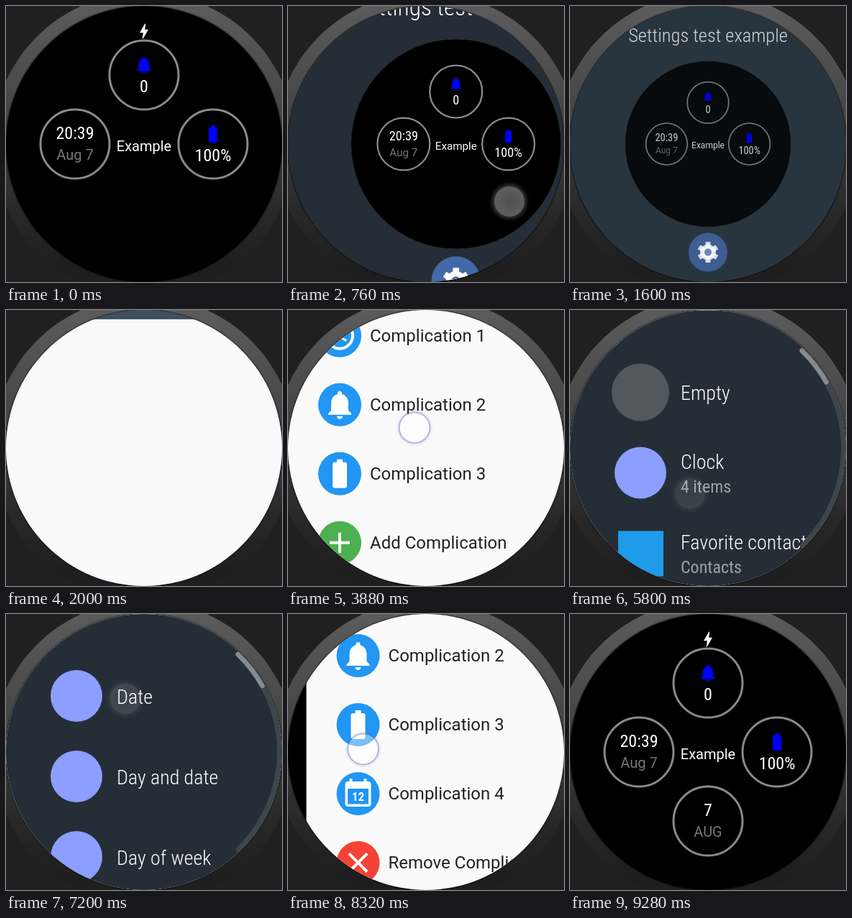
Animation of 384x384 px, one loop 9.52 s. Source, as an HTML page with a canvas:

```html
<!DOCTYPE html>
<html lang="en">
<head>
<meta charset="utf-8">
<title>Watch complications</title>
<style>
html, body { margin: 0; width: 100%; height: 100%; overflow: hidden; background: #202020; }
canvas { display: block; width: 384px; height: 384px; }
</style>
</head>
<body>
<canvas id="stage" width="384" height="384"></canvas>
<script>
const ctx = document.getElementById('stage').getContext('2d');
const LOOP = 9520, SIZE = 384, MID = 192, TAU = Math.PI * 2;
const SANS = 'Roboto, sans-serif';
const NARROW = '"Roboto Condensed", Roboto, sans-serif';
const BLUE = '#2196f3', SLATE = '#252e36', LIST_SCROLL = 158;

// 24-unit icon outlines
const ICON = {
  bell: new Path2D('M12 22c1.1 0 2-.9 2-2h-4c0 1.1.9 2 2 2zm6-6v-5c0-3.07-1.64-5.64-4.5-6.32V4c0-.83-.67-1.5-1.5-1.5s-1.5.67-1.5 1.5v.68C7.63 5.36 6 7.92 6 11v5l-2 2v1h16v-1l-2-2z'),
  battery: new Path2D('M15.67 4H14V2h-4v2H8.33C7.6 4 7 4.6 7 5.33v15.34C7 21.4 7.6 22 8.33 22h7.34c.73 0 1.33-.6 1.33-1.33V5.33C17 4.6 16.4 4 15.67 4z'),
  bolt: new Path2D('M11 21h-1l1-7H7.5c-.6 0-.6-.3-.4-.7L13 3h1l-1 7h3.5c.5 0 .6.3.4.7L11 21z'),
  plus: new Path2D('M19 13h-6v6h-2v-6H5v-2h6V5h2v6h6z'),
  cross: new Path2D('M19 6.4L17.6 5 12 10.6 6.4 5 5 6.4 10.6 12 5 17.6 6.4 19 12 13.4 17.6 19 19 17.6 13.4 12z'),
  hands: new Path2D('M12.5 7H11v6l5.25 3.15.75-1.23-4.5-2.67z')
};

const clamp = v => Math.min(1, Math.max(0, v));
const span = (t, from, to) => clamp((t - from) / (to - from));
const easeOut = (p, k) => 1 - Math.pow(1 - p, k);

function layer(alpha, dx, dy, draw) {
  if (alpha <= 0) return;
  ctx.save();
  ctx.globalAlpha *= alpha;
  ctx.translate(dx, dy);
  draw();
  ctx.restore();
}

function disc(x, y, r, color) {
  ctx.beginPath();
  ctx.arc(x, y, r, 0, TAU);
  ctx.fillStyle = color;
  ctx.fill();
}

function ring(x, y, r, width, color, from = 0, to = TAU) {
  ctx.beginPath();
  ctx.arc(x, y, r, from, to);
  ctx.lineWidth = width;
  ctx.strokeStyle = color;
  ctx.stroke();
}

function fillScreen(color) {
  ctx.fillStyle = color;
  ctx.fillRect(0, 0, SIZE, SIZE);
}

function text(str, x, y, size, color, align = 'left', family = SANS, weight = 400) {
  ctx.font = `${weight} ${size}px ${family}`;
  ctx.textAlign = align;
  ctx.fillStyle = color;
  ctx.fillText(str, x, y);
}

function icon(path, x, y, scale, color) {
  ctx.save();
  ctx.translate(x, y);
  ctx.scale(scale, scale);
  ctx.translate(-12, -12);
  ctx.fillStyle = color;
  ctx.fill(path);
  ctx.restore();
}

// Touch marks: a soft grey glow on dark screens, a thin outline on light ones
function darkTouch(x, y, alpha) {
  layer(alpha, x, y, () => {
    const glow = ctx.createRadialGradient(0, 0, 0, 0, 0, 28);
    glow.addColorStop(0, 'rgba(255,255,255,.31)');
    glow.addColorStop(.72, 'rgba(255,255,255,.37)');
    glow.addColorStop(.79, 'rgba(190,205,225,.18)');
    glow.addColorStop(1, 'rgba(190,205,225,0)');
    disc(0, 0, 28, glow);
  });
}

function lightTouch(x, y, alpha) {
  layer(alpha, x, y, () => {
    const glow = ctx.createRadialGradient(0, 0, 20, 0, 0, 26);
    glow.addColorStop(0, 'rgba(85,95,180,.22)');
    glow.addColorStop(1, 'rgba(85,95,180,0)');
    ring(0, 0, 23, 6, glow);
    disc(0, 0, 21.5, 'rgba(255,255,255,.4)');
    ring(0, 0, 21.5, 1.6, 'rgba(85,95,180,.4)');
  });
}

const tap = (t, from, to) => span(t, from - 20, from + 40) * (1 - span(t, to - 120, to));

// Watch face
function face({ full = false, charging = true } = {}) {
  const label = (s, x, y) => text(s, x, y, 24, '#fff', 'center', NARROW);
  const note = (s, x, y) => text(s, x, y, 20, '#777', 'center');
  fillScreen('#000');
  if (charging) icon(ICON.bolt, 192, 35, 1.15, '#fff');
  const spots = [[192, 96], [96, 192], [288, 192]];
  if (full) spots.push([192, 288]);
  for (const [x, y] of spots) ring(x, y, 48, 3, '#8a8a8a');
  icon(ICON.bell, 192, 82, 1.2, '#00f');
  label('0', 192, 120);
  label('20:39', 96, 185);
  note('Aug 7', 96, 214);
  icon(ICON.battery, 288, 178, 1.2, '#00f');
  label('100%', 288, 216);
  text('Example', 192, 202, 20, '#fff', 'center');
  if (full) {
    label('7', 192, 281);
    note('AUG', 192, 310);
  }
}

function gear(x, y, r) {
  disc(x, y, 45, '#4469a8');
  disc(x, y, r * .76, '#fff');
  for (let i = 0; i < 6; i++) {
    ctx.save();
    ctx.translate(x, y);
    ctx.rotate(i * TAU / 6);
    ctx.fillRect(-r * .24, -r, r * .48, r);
    ctx.restore();
  }
  disc(x, y, r * .35, '#4469a8');
}

// Face shrinking into the face picker
function picker(t) {
  const p = easeOut(span(t, 680, 960), 2.7);
  const scale = 1 - .4 * p;
  const leave = span(t, 1560, 1760);
  fillScreen('#000');
  layer(span(p, 0, .3), 0, 0, () => fillScreen(SLATE));
  layer(leave, 0, 0, () => fillScreen('#3e515f'));
  layer(1 - leave, MID + 44 * Math.sin(Math.PI * p), MID, () => {
    ctx.scale(scale, scale);
    ctx.translate(-MID, -MID);
    if (p > 0) {
      text('Settings test example', MID, -44, 44, '#fff', 'center', NARROW, 300);
      gear(MID, 443, 24);
    }
    ctx.beginPath();
    ctx.arc(MID, MID, MID, 0, TAU);
    ctx.clip();
    face({ charging: p === 0 });
  });
  darkTouch(308, 272, tap(t, 260, 960));
  darkTouch(192, 343, tap(t, 1240, 1520));
}

// Settings list
const glyph = {
  clock(x, y) {
    ring(x, y, 18, 4, '#fff');
    icon(ICON.hands, x, y, 2, '#fff');
  },
  bell: (x, y) => icon(ICON.bell, x, y, 2, '#fff'),
  battery: (x, y) => icon(ICON.battery, x, y, 2, '#fff'),
  plus: (x, y) => icon(ICON.plus, x, y, 2, '#fff'),
  cross: (x, y) => icon(ICON.cross, x, y, 2, '#fff'),
  empty() {},
  date(x, y) {
    ctx.fillStyle = '#fff';
    ctx.fillRect(x - 12, y - 21, 4, 6);
    ctx.fillRect(x + 8, y - 21, 4, 6);
    ctx.beginPath();
    ctx.roundRect(x - 18, y - 17, 36, 35, 4);
    ctx.fill();
    ctx.fillStyle = BLUE;
    ctx.fillRect(x - 14.5, y - 7, 29, 21.5);
    text('12', x, y + 10, 17, '#fff', 'center', NARROW, 700);
  }
};

function list(scroll, fourth) {
  const rows = [
    ['Complication 1', BLUE, 'clock'],
    ['Complication 2', BLUE, 'bell'],
    ['Complication 3', BLUE, 'battery'],
    fourth ? ['Complication 4', BLUE, fourth] : ['Add Complication', '#4caf50', 'plus'],
    ['Remove Complication', '#f44336', 'cross']
  ];
  fillScreen('#fafafa');
  rows.forEach(([name, color, kind], i) => {
    const y = 120 + 96 * i - scroll;
    disc(72, y, 30, color);
    glyph[kind](72, y);
    text(name, 114, y + 8, 24, '#212121');
  });
}

function settings(t) {
  if (t < 3320) {
    fillScreen('#fafafa');
    if (t >= 2880) text('Loading complications', MID, 202, 28, '#212121', 'center');
    return;
  }
  const scroll = LIST_SCROLL * easeOut(span(t, 3720, 4280), 2.25);
  list(scroll, t < 4800 ? '' : t < 7000 ? 'empty' : 'date');
  lightTouch(176, 248 - scroll, tap(t, 3720, 4080));
  lightTouch(166, 252, tap(t, 4680, 4960));
  lightTouch(167, 255, tap(t, 5520, 5880));
}

// Data chooser
function rowText(y, title, detail) {
  text(title, 154, detail ? y - 5 : y + 11, 28, '#fff', 'left', NARROW, 300);
  if (detail) text(detail, 154, y + 28, 24, '#9da2a5', 'left', NARROW);
}

function choices(draw) {
  ctx.save();
  ctx.beginPath();
  ctx.rect(0, 0, 332, SIZE);
  ctx.clip();
  draw();
  ctx.restore();
}

function sources() {
  disc(98, 114, 40, '#51585e');
  rowText(114, 'Empty');
  disc(98, 226, 36, '#8c9eff');
  rowText(226, 'Clock', '4 items');
  ctx.fillStyle = '#1e9be9';
  ctx.fillRect(67, 307, 63, 63);
  rowText(338, 'Favorite contact', 'Contacts');
}

function clockItems() {
  ['Date', 'Day and date', 'Day of week'].forEach((name, i) => {
    const y = 114 + 112 * i;
    disc(98, y, 36, '#8c9eff');
    rowText(y, name);
  });
}

function chooser(t) {
  fillScreen(SLATE);
  const swap = span(t, 6600, 6800);
  layer(1 - swap, 0, 0, () => choices(sources));
  layer(swap, 0, 0, () => choices(clockItems));
  ctx.lineCap = 'round';
  ring(MID, MID, 188.5, 6.5, '#3d464c', -.8, .8);
  ring(MID, MID, 188.5, 6.5, '#858b8f', -.805, -.51);
  ctx.lineCap = 'butt';
  darkTouch(167, 255, .28 * tap(t, 5520, 5960));
  darkTouch(166, 240, tap(t, 6480, 6760));
  darkTouch(166, 118, tap(t, 7200, 7400));
}

// A new screen rises the last 8% of the height
function openOver(t, start, draw) {
  if (t < start) return;
  const rise = 31 * Math.pow(1 - span(t, start, start + 350), 5);
  layer(span(t, start, start + 50), 0, rise, draw);
}

function screen(t) {
  if (t < 240) return face();
  if (t < 2320) {
    picker(t);
    return openOver(t, 1945, () => settings(t));
  }
  if (t < 7480) {
    settings(t);
    const out = span(t, 7280, 7480);
    return layer(1 - out, 0, 31 * out * out, () => openOver(t, 5600, () => chooser(t)));
  }
  face({ full: true });
  const dx = SIZE * Math.pow(span(t, 8200, 8920), 1.52);
  if (dx < SIZE) layer(1, dx, 0, () => list(LIST_SCROLL, 'date'));
  lightTouch(79 + dx, 188, tap(t, 8160, 8640));
}

function bezel() {
  fillScreen('#202020');
  const shade = ctx.createLinearGradient(0, 0, 0, SIZE);
  shade.addColorStop(0, '#5b5b5b');
  shade.addColorStop(.3, '#4a4a4a');
  shade.addColorStop(.55, '#383838');
  shade.addColorStop(.75, '#282828');
  shade.addColorStop(.95, '#1e1e1e');
  disc(MID, MID, 211, shade);
  ring(MID, MID, 192, 3, 'rgba(0,0,0,.35)');
}

function draw() {
  const t = performance.now() % LOOP;
  bezel();
  ctx.save();
  ctx.beginPath();
  ctx.arc(MID, MID, MID, 0, TAU);
  ctx.clip();
  screen(t);
  ctx.restore();
  requestAnimationFrame(draw);
}
draw();
</script>
</body>
</html>
```
